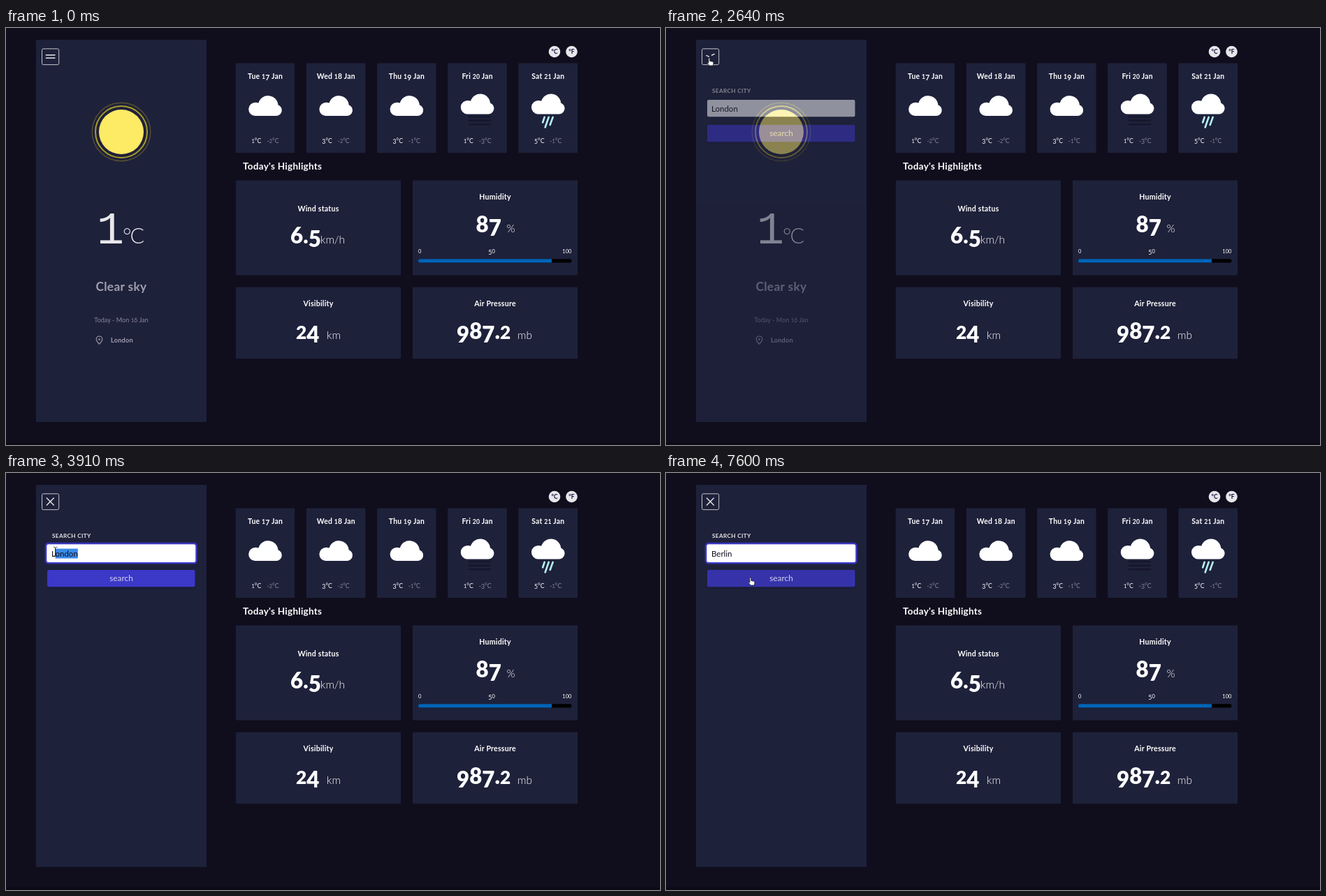
An HTML page for the animation above (8000 ms loop, 936 px wide and 598 px high).

```html
<!DOCTYPE html>
<html lang="en">
<meta charset="utf-8">
<style>
html, body { margin: 0; height: 100%; overflow: hidden; background: #100e1d }
svg { display: block; font-family: Lato, sans-serif; fill: #fff }
.low { font-size: .84em }
.drop { baseline-shift: -.17em }
.bold { font-weight: 700; letter-spacing: .02em }
.mid { text-anchor: middle }
.box { fill: #1e213a }
.line { fill: none; stroke-linecap: round }
</style>
<svg id="stage" width="936" height="598" viewBox="0 0 936 598"></svg>
<script>
const LOOP = 8000;
const $ = id => document.getElementById(id);

// Old-style figures: small 0 1 2, hanging 3 4 5 7 9
const figures = s => s
  .replace(/[012]+/g, '<tspan class="low">$&</tspan>')
  .replace(/[34579]+(?![^<]*>)/g, '<tspan class="drop">$&</tspan>');
const text = (x, y, size, s, cls = '', attrs = '') =>
  `<text x="${x}" y="${y}" font-size="${size}" class="${cls}" ${attrs}>${figures(s)}</text>`;
const rect = (x, y, w, h, attrs = 'class="box"', r = 1) =>
  `<rect x="${x}" y="${y}" width="${w}" height="${h}" rx="${r}" ${attrs}/>`;
const stroke = (d, color, width, attrs = '') =>
  `<path class="line" d="${d}" stroke="${color}" stroke-width="${width}" ${attrs}/>`;

const cloud = `<path d="M10 29.5a9.7 9.7 0 0 1 1-19.4q2 0 4 .8A14.3 14.3 0 0 1 43 13.6a8.2 8.2 0 0 1-2.6 15.9z"/>`;
const fog = stroke('M13 33.5h30M13 38.8h30M13 44.2h30', '#14162b', 2.4);
const rain = stroke('M19.5 34l-2.5 7.5M25.5 34l-5 14.5M31.5 34l-4 11', '#b4eef2', 2.7);

const day = ([title, high, low, extra = ''], i) => `<g transform="translate(${328.7 + 101.2 * i} 50.5)">
  ${rect(0, 0, 84.5, 128.5)}
  ${text(42.3, 22, 10.4, title, 'bold mid')}
  <g transform="translate(17.7 ${extra ? 43.4 : 46.1})">${cloud + extra}</g>
  ${text(29.7, 114.5, 8.8, high + '°C', 'mid')}
  ${text(53.3, 114.5, 8.8, low + '°C', 'mid', 'fill="#88869d"')}</g>`;

const unit = (x, s) => `<circle cx="${x}" cy="34" r="8.3" fill="#e7e7eb"/>` +
  text(x, 37, 8.5, s, 'mid', 'fill="#110e3c" font-weight="700"');

const card = (x, y, h, title, titleY, value, valueX, valueY, units, unitX) =>
  rect(x, y, 236, h) + text(x + 118, titleY, 10.6, title, 'bold mid') +
  text(valueX, valueY, 31.3, value, '', 'font-weight="900"') +
  text(unitX, valueY, 15.5, units, '', 'font-weight="300"');

const today = `
  <circle cx="165" cy="149" r="32" fill="#fdea65"/>
  <circle cx="165" cy="149" r="37" fill="none" stroke="#a89a2c" stroke-width="2"/>
  <circle cx="165" cy="149" r="41.8" fill="none" stroke="#55512f" stroke-width="1.4"/>
  <text x="130" y="309" font-size="65" font-family="Liberation Mono, monospace" fill="#e7e7eb">1</text>
  ${text(167, 309, 30.5, '°C', '', 'font-weight="300" letter-spacing="-2" fill="#e7e7eb"')}
  ${text(165, 377, 17.3, 'Clear sky', 'mid bold', 'fill="#a09fb1"')}
  ${text(165, 422, 9.1, 'Today - Mon 16 Jan', 'mid', 'fill="#88869d"')}
  ${stroke('M133.5 453.3q-4.3-4.6-4.3-7a4.3 4.3 0 0 1 8.6 0q0 2.4-4.3 7z', '#a09fb1', 1.1)}
  <circle cx="133.5" cy="446.5" r="1.2" fill="#a09fb1"/>
  ${text(150, 451, 9.2, 'London', 'bold', 'fill="#a09fb1"')}`;

// The form carries its own panel, so fading it in cross-fades the two views
const form = `<g id="form">
  ${rect(43, 17, 244, 548)}
  ${text(66, 93, 8.1, 'SEARCH CITY', '', 'font-weight="700" letter-spacing=".4" fill="#e7e7eb"')}
  ${rect(59, 103, 211.5, 24.3, 'fill="#fff"', 2)}
  <g id="focus">
    ${rect(55.5, 99.5, 218.5, 31.3, 'fill="#3c38c8" opacity=".45"', 5)}
    ${rect(57.3, 101.3, 215, 27.7, 'fill="#fff" stroke="#3c38c8" stroke-width="2"', 3.5)}
  </g>
  <rect id="selection" y="108.5" height="14" fill="#3a8bea"/>
  <text id="city" x="65" y="119.5" font-size="11.5" fill="#100e1d"></text>
  <path id="caret" stroke="#100e1d" stroke-width=".8"/>
  ${rect(58, 140, 213.5, 26.5, 'fill="#1a1b3d" opacity=".6"', 4)}
  ${rect(59, 139, 211.5, 24.3, 'id="button"', 2)}
  ${text(165, 155, 11.8, 'search', 'mid', 'fill="#d2d1f0"')}</g>`;

$('stage').innerHTML =
  rect(43, 17, 244, 548) + rect(0, 594, 936, 4, 'fill="#0c0a16"', 0) + today + form +
  rect(51.5, 29.8, 24.2, 22.8, 'fill="none" stroke="#c4c4cc" stroke-width="1"', 2) +
  stroke('', '#e7e7eb', 1.4, 'id="burger"') +
  unit(785, '°C') + unit(809.5, '°F') +
  [['Tue 17 Jan', '1', '-2'], ['Wed 18 Jan', '3', '-2'], ['Thu 19 Jan', '3', '-1'],
   ['Fri 20 Jan', '1', '-3', fog], ['Sat 21 Jan', '5', '-1', rain]].map(day).join('') +
  text(339, 203, 13.5, "Today's Highlights", 'bold') +
  card(329, 218.5, 136, 'Wind status', 262.5, '6.5', 407, 309, 'km/h', 450) +
  card(582, 218.5, 136, 'Humidity', 246, '87', 672.5, 292.5, '%', 716.5) +
  card(329, 371.7, 102.5, 'Visibility', 399, '24', 415, 445.5, 'km', 459) +
  card(582, 371.7, 102.5, 'Air Pressure', 399, '987.2', 645, 445.5, 'mb', 732) +
  text(590, 323, 9, '0') + text(695, 323, 9, '50', 'mid') + text(809.5, 323, 9, '100', '', 'text-anchor="end"') +
  rect(590, 331.3, 219.5, 5.2, 'fill="#000"', 2.6) +
  '<path d="M781 331.3H592.6a2.6 2.6 0 0 0 0 5.2H781z" fill="#0064b6"/>' +
  `<g id="pointer" stroke="#111" stroke-width=".7" stroke-linejoin="round">
    <path id="arrow" d="M0 0v9.3l2.2-2 1.5 3.2 1.4-.7-1.5-3.1h2.9z"/>
    <path id="hand" d="M-.2.8q1-1.6 2 0v3.6l4 .8q1.4.4 1.2 2L6.2 11H1.2L-2 7.2q.4-1.4 2 0z"/>
    <path id="beam" class="line" d="M-2.5-6.5q2.5 0 2.5 1.5v10q0 1.5-2.5 1.5M2.5-6.5q-2.5 0-2.5 1.5v10q0 1.5 2.5 1.5"/></g>`;

const clamp = v => Math.min(1, Math.max(0, v));
const span = (t, a, b) => clamp((t - a) / (b - a));
const ease = p => p < .5 ? 4 * p ** 3 : 1 - 4 * (1 - p) ** 3;
const smooth = p => p * p * (3 - 2 * p);
const mix = (a, b, p) => a + (b - a) * p;

// Pointer stops: time, x, y
const route = [[0, 841, 590], [240, 841, 590], [940, 165, 167], [1070, 161, 166], [1700, 61, 43], [2850, 61, 43],
  [3130, 93, 97], [3490, 122, 111], [3690, 122, 111], [4100, 30, 114], [4180, 35, 115], [5039, 35, 115],
  [5040, 33, 111], [6560, 33, 111], [7110, 174, 149], [7390, 124, 150], [7600, 120, 150], [LOOP, 120, 150]];
const keys = [[0, 'London'], [5040, 'B'], [5310, 'Be'], [5440, 'Ber'], [5700, 'Berl'], [5830, 'Berli'], [5960, 'Berlin']];

function pointerAt(t) {
  const i = route.findIndex(stop => stop[0] > t);
  const [t0, x0, y0] = route[i - 1], [t1, x1, y1] = route[i];
  const p = smooth(span(t, t0, t1));
  return [mix(x0, x1, p), mix(y0, y1, p)];
}

function drawBurger(t) {
  const turn = smooth(span(t, 2320, 2960));
  const shown = t < 3600 ? mix(1, .32, span(t, 2500, 2640)) : mix(.32, 1, span(t, 3640, 3850));
  const bar = (x0, y0, x1, y1) => `M${x0} ${y0}L${mix(x0, x1, shown)} ${mix(y0, y1, shown)}`;
  const left = mix(57.3, 58.4, turn), right = mix(70, 68.3, turn);
  $('burger').setAttribute('d',
    bar(right, mix(38.8, 36, turn), left, mix(38.8, 46, turn)) +
    bar(left, mix(43, 36, turn), right, mix(43, 46, turn)));
}

function drawForm(t, x) {
  $('form').setAttribute('opacity', ease(span(t, 2370, 2910)));
  $('focus').setAttribute('opacity', span(t, 3690, 3850));

  const city = $('city');
  city.textContent = keys.findLast(k => k[0] <= t)[1];
  const end = 65 + city.getComputedTextLength();
  const selecting = t >= 3760 && t < 5040;
  const from = Math.min(end, Math.max(65, x));
  $('selection').setAttribute('x', from);
  $('selection').setAttribute('width', selecting ? end - from : 0);
  city.setAttribute('fill', selecting && from < 70 ? '#fff' : '#100e1d');

  const caret = t >= 5040 && t < 6360 || t >= 6860 && t < 7360;
  $('caret').setAttribute('d', caret ? `M${end + .5} 109.5v12` : '');
  const hover = span(t, 7390, 7600);
  $('button').setAttribute('fill', `rgb(${mix(60, 54, hover)} ${mix(56, 51, hover)} ${mix(200, 170, hover)})`);
}

function frame(now) {
  const t = now % LOOP, [x, y] = pointerAt(t);
  drawBurger(t);
  drawForm(t, x);
  const kind = x > 51 && x < 76 && y < 53 || t > 6560 && y > 139 ? 'hand'
    : t > 3300 && t < 5040 && y > 103 ? 'beam' : 'arrow';
  for (const id of ['arrow', 'hand', 'beam']) $(id).style.display = id === kind ? '' : 'none';
  $('beam').style.stroke = x < 58 ? '#ddd' : '#111';
  $('pointer').style.display = t < 240 ? 'none' : '';
  $('pointer').setAttribute('transform', `translate(${x} ${y})`);
  requestAnimationFrame(frame);
}
requestAnimationFrame(frame);
</script>
</html>
```
